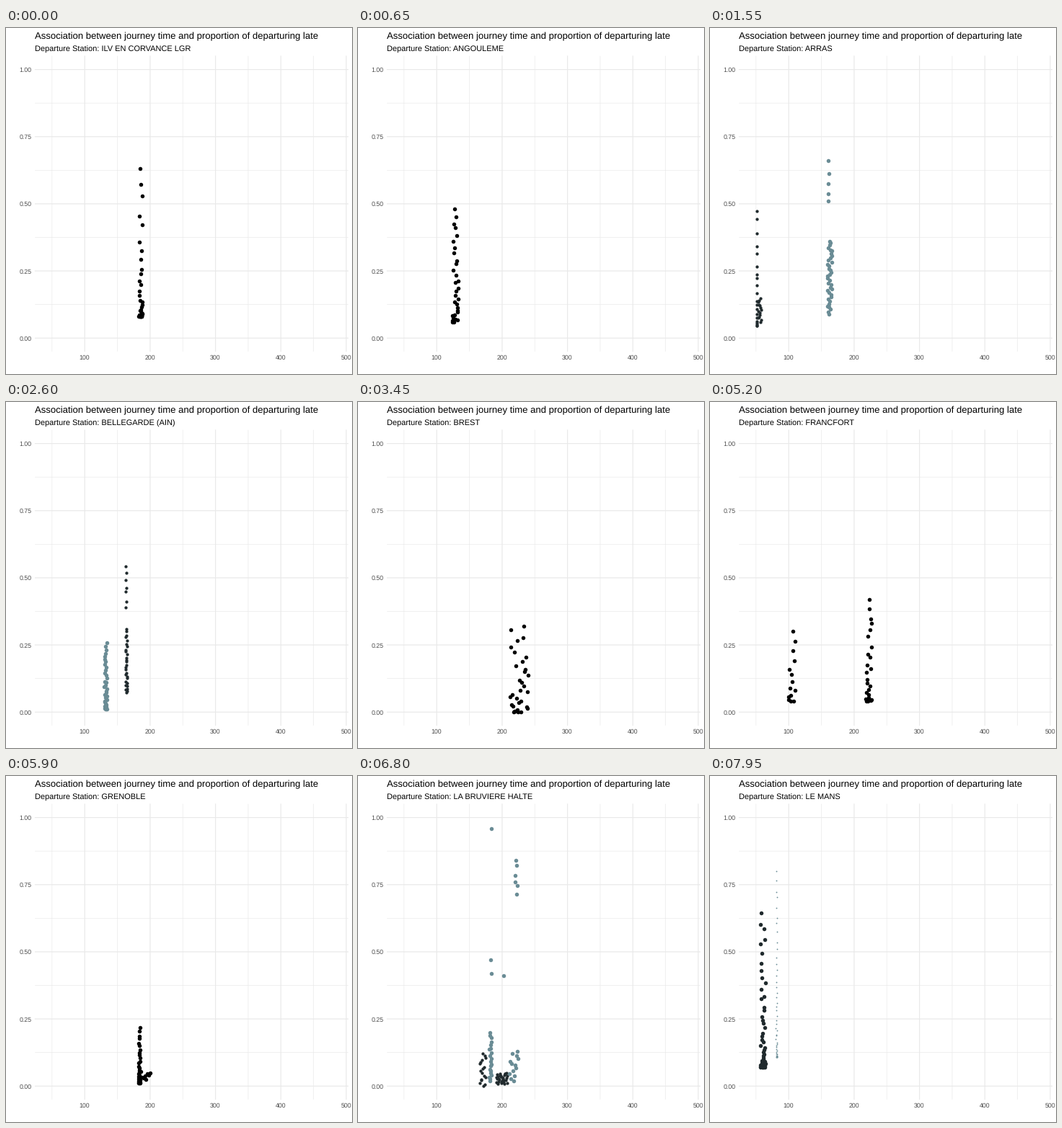
Animation of 480x480 px, one loop 8 s. Source, as a matplotlib script:

```python
import numpy as np
import matplotlib.pyplot as plt
from matplotlib.animation import FuncAnimation

plt.rcParams["font.family"] = "Liberation Sans"
plt.rcParams["text.hinting"] = "none"

SIZE, DPI = 480, 72
STEP_MS, N_FRAMES = 50, 160
CYCLE, STEPS = 7, 4            # frames per station, steps per transition
FULL, GONE = 5.5, 0.6          # dot diameters in px
TEAL = np.array([146, 192, 205]) / 255

rng = np.random.default_rng(7)


def px(minutes):
    return 18.5 + 0.907 * minutes


def py(share):
    return 430.2 - 372.6 * share


def cloud(x0, x1, lo, hi, n=32, skew=2.0):
    """Dots spread over journey times x0..x1, late percentages crowded towards lo."""
    u = rng.permutation(np.linspace(0, 1, n))
    v = np.linspace(0, 1, n)
    v[1:-1] += rng.uniform(-0.4, 0.4, max(n - 2, 0)) / n
    share = (lo + (hi - lo) * v ** skew) / 100
    return np.column_stack([px(x0 + (x1 - x0) * u), py(share)])


def dot(x, y):
    return cloud(x, x, y, y, 1)


stops = [
    ("ILV EN CORVANCE LGR", cloud(183, 188.3, 8, 63, 36, 4.2)),
    ("ARDENS SAINT MORE", cloud(90, 97, 5, 45)),
    ("ANGOULEME", cloud(124, 133, 6, 48)),
    ("ANNECY", cloud(218, 237, 0, 40)),
    ("ARRAS", cloud(51, 51.8, 4.5, 47.3, 20), cloud(53, 58, 6, 14.7, 14, 1)),
    ("ALMERIS LGR", cloud(160, 161, 51, 66, 5, 1), cloud(159, 166, 9, 36, 36, 1)),
    ("BARCELONA", cloud(384, 391.5, 8, 55)),
    ("BELLEGARDE (AIN)", cloud(162.4, 163.6, 39, 54.3, 7, 1),
     cloud(162.2, 165.2, 7.4, 31, 28, 1.3)),
    ("BELVARON HAUTE COMBRE LGR", cloud(130, 134, 1.1, 25.7, 36, 1.8)),
    ("BRANDOUX ST LEON", cloud(138, 150, 4, 38), cloud(294, 302, 3, 40, 20)),
    ("BREST", cloud(212, 240, 0, 32)),
    ("CHAVEROL SABLES LES BAINS", cloud(172, 181, 9, 60)),
    ("DORNEY VILLE", cloud(97.5, 100, 9, 45)),
    ("DOUAI", cloud(77, 79.5, 0.7, 26.4, 16, 1.3), cloud(76.2, 85, 2.5, 7, 26, 1)),
    ("DUNKERQUE", cloud(101, 118, 0, 28)),
    ("FRANCFORT", cloud(99.5, 110, 4, 30, 14), cloud(218, 227, 4, 42, 24)),
    ("GENEVE", cloud(183, 198, 4, 35)),
    ("GRENOBLE", cloud(182.3, 184.7, 1.2, 21.8, 30, 2.2), cloud(186, 200, 2.6, 5.5, 8, 1)),
    ("ITALIE", cloud(418, 453, 2, 60)),
    ("LA BRUVIERE HALTE", cloud(165.5, 175, 0, 12.1, 17, 1.1),
     cloud(191, 208, 0.8, 4.9, 30, 1)),
    ("LAUSANNE", cloud(180.5, 184, 1.9, 20, 20, 1.2), cloud(182.4, 183.7, 42, 47, 2),
     cloud(211, 224.6, 2, 13, 13, 1), cloud(219.5, 223.5, 71.5, 84, 6, 1),
     dot(202.4, 41), dot(183.6, 95.8)),
    ("LAVAL", cloud(85, 96, 5, 45)),
    ("LE VERSOT MONTBRUEL MONTFERLIN", cloud(80.4, 82.4, 10.7, 79.9, 46, 2.4)),
    ("LE MANS", cloud(56.4, 64.2, 7, 64.6, 46, 2.7)),
]
names = [s[0] for s in stops]
points = [np.vstack(s[1:]) for s in stops]

fig = plt.figure(figsize=(SIZE / DPI, SIZE / DPI), dpi=DPI, facecolor="white")
ax = fig.add_axes([0, 0, 1, 1])
ax.set(xlim=(0, SIZE), ylim=(SIZE, 0))
ax.axis("off")


def grid_line(xs, ys, major):
    ax.plot(xs, ys, color="#E9E9E9", lw=1.2 if major else 0.65, snap=False)


def label(x, y, s, size, color="black", ha="left"):
    return ax.text(x, y, s, fontsize=size, color=color, ha=ha, va="baseline")


for major in (False, True):
    for m in range(100 if major else 50, 501, 100):
        grid_line([px(m)] * 2, [39, 448.5], major)
    for e in range(0 if major else 1, 9, 2):
        grid_line([40.5, 474.5], [py(e / 8)] * 2, major)

for m in range(100, 501, 100):
    label(px(m) - 0.4, 460, str(m), 8.8, "#4D4D4D", "center")
for q in range(5):
    label(35.5, py(q / 4) + 3.4, f"{q / 4:.2f}", 8.8, "#4D4D4D", "right")
label(40.3, 15.3, "Association between journey time and proportion of departuring late", 13.17)
subtitle = label(40.3, 32.5, "", 11)

leaving = ax.scatter([], [], linewidths=0, zorder=3)
entering = ax.scatter([], [], linewidths=0, zorder=4)


def show(dots, pts, diameter, tint):
    dots.set_offsets(pts)
    dots.set_sizes([diameter ** 2])
    dots.set_facecolor([tuple(TEAL * tint ** 1.1)])


def update(frame):
    k, step = divmod(max(frame - 2, 0), CYCLE)
    if step >= STEPS:
        k, step = k + 1, 0
    t = step / STEPS
    show(leaving, points[k], FULL + (GONE - FULL) * t, t)
    entering.set_visible(step > 0)
    if step:
        show(entering, points[k + 1], FULL, 1 - t)
    subtitle.set_text("Departure Station: " + names[k + (t >= 0.5)])
    return leaving, entering, subtitle


anim = FuncAnimation(fig, update, frames=N_FRAMES, interval=STEP_MS,
                     repeat=True, repeat_delay=0, blit=False)
plt.show()
```
